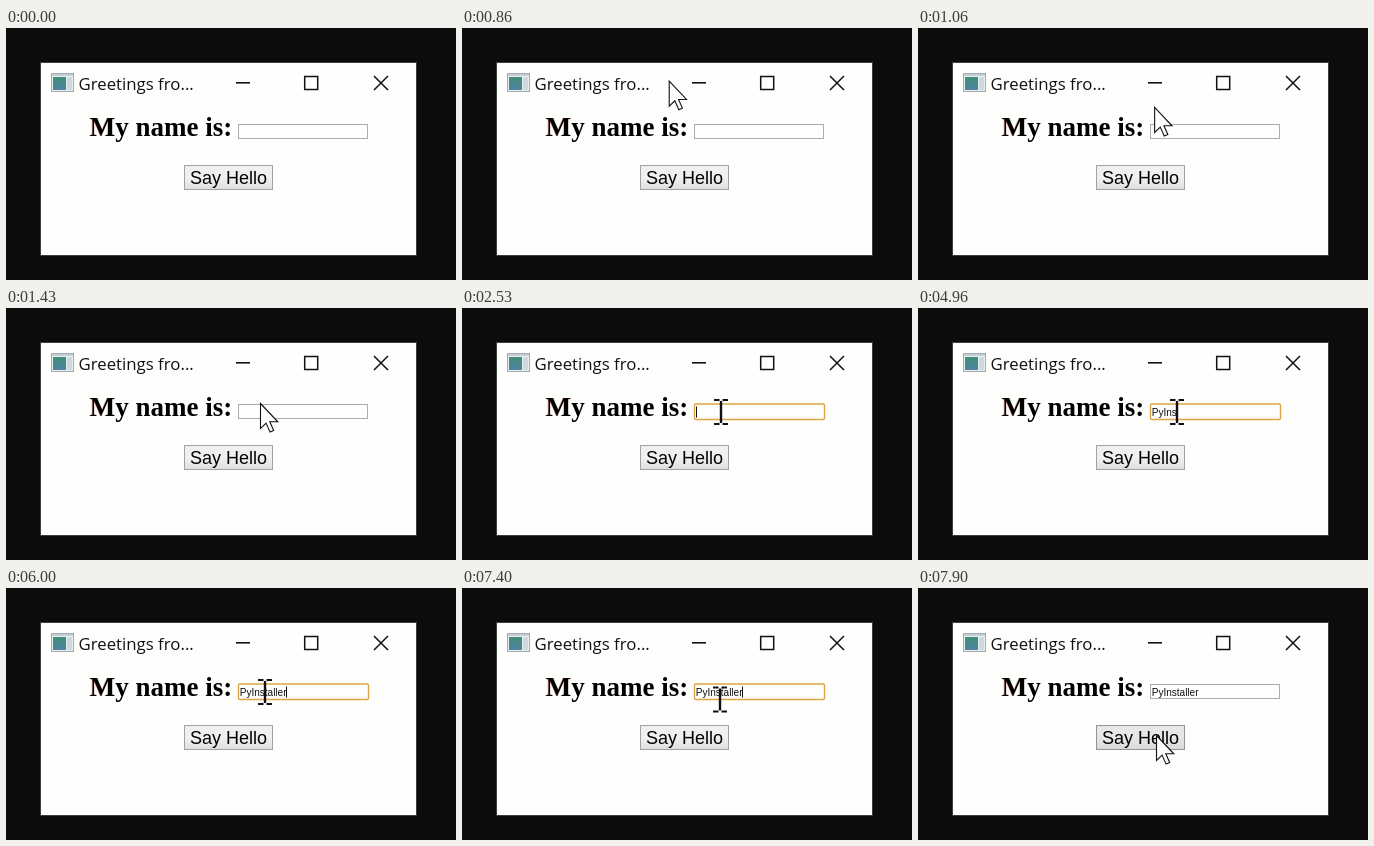
An HTML page with a canvas for the animation above (8000 ms loop, 450 by 252 pixels).

```html
<!DOCTYPE html>
<html lang="en">
<head>
<meta charset="utf-8">
<title>Greeting window</title>
<style>
  html, body { margin: 0; width: 100%; height: 100%; overflow: hidden; background: #0b0b0b; }
  canvas { display: block; width: 450px; height: 252px; }
</style>
</head>
<body>
<canvas id="stage" width="450" height="252"></canvas>
<script>
const ctx = document.getElementById('stage').getContext('2d');
const LOOP = 8000;
const NAME = 'PyInstaller';
const KEY_TIMES = [4100, 4330, 4600, 4800, 4960, 5260, 5360, 5530, 5700, 5900, 6000];
const ARIAL = '"Liberation Sans", Arial, sans-serif';

const lerp = (a, b, p) => a + (b - a) * p;
const easeOut = (p, power) => 1 - Math.pow(1 - p, power);

// Progress from 0 to 1, held between pointer updates.
function stepped(t, start, end, steps) {
  const p = Math.floor((t - start) / (end - start) * steps + 0.04) / steps;
  return Math.min(1, Math.max(0, p));
}

function box(x, y, w, h, fill) {
  ctx.fillStyle = fill;
  ctx.fillRect(x, y, w, h);
}

function outline(x, y, w, h, color, width = 1) {
  ctx.strokeStyle = color;
  ctx.lineWidth = width;
  ctx.strokeRect(x, y, w, h);
}

function text(str, x, y, font, color = '#000') {
  ctx.font = font;
  ctx.fillStyle = color;
  ctx.fillText(str, x, y);
}

function line(width, ...points) {
  ctx.strokeStyle = '#111';
  ctx.lineWidth = width;
  ctx.beginPath();
  for (let i = 0; i < points.length; i += 4) {
    ctx.moveTo(points[i], points[i + 1]);
    ctx.lineTo(points[i + 2], points[i + 3]);
  }
  ctx.stroke();
}

function vertical(y0, y1, ...colors) {
  const g = ctx.createLinearGradient(0, y0, 0, y1);
  colors.forEach((c, i) => g.addColorStop(i / (colors.length - 1), c));
  return g;
}

function drawWindow() {
  box(0, 0, 450, 252, '#0c0c0c');
  box(34, 34, 377, 194, '#38403e');
  box(35, 35, 375, 192, '#fefefd');

  box(45, 45, 23, 19, '#a3abb0');
  box(46, 46, 21, 17, '#e9eef0');
  box(46, 46, 21, 2, '#c3ccd2');
  box(47, 49, 13, 13, vertical(49, 62, '#3f8f78', '#4f82a0'));
  box(61, 49, 5, 13, '#cfd8dc');

  text('Greetings fro...', 72.5, 62, '16.8px "Open Sans", "Noto Sans", sans-serif', '#111');
  line(1.6, 230, 54.8, 244, 54.8);
  outline(298.7, 48.5, 13, 13, '#111', 1.5);
  line(1.5, 368, 48, 382, 62, 382, 48, 368, 62);

  const heading = 'bold 27px "Liberation Serif", "Times New Roman", serif';
  text('M', 83, 108, heading, 'rgba(220,80,60,.55)');
  text('My name is:', 83.7, 108, heading);
}

function drawInput(t) {
  const focused = t >= 2530 && t < 7900;
  box(232, 96, 130, 15, '#fff');
  if (focused) {
    ctx.beginPath();
    ctx.roundRect(232.5, 96, 130, 15.5, 1.5);
    ctx.strokeStyle = '#dca543';
    ctx.lineWidth = 1.4;
    ctx.stroke();
  } else {
    outline(232.5, 96.5, 129, 14, '#acacac');
  }

  const typed = NAME.slice(0, KEY_TIMES.filter(k => t >= k).length);
  text(typed, 233.8, 107.5, '10px ' + ARIAL, '#111');

  const blinkOff = (t >= 3860 && t < 4100) || (t >= 6530 && t < 7060) || t >= 7590;
  if (focused && !blinkOff) {
    box(Math.round(233.8 + ctx.measureText(typed).width), 98.5, 1, 11, '#111');
  }
}

function drawButton(hover, pressed) {
  const [top, bottom, border] =
    pressed ? ['#e7e7e7', '#d9d9d9', '#949494'] :
    hover ? ['#f3f3f3', '#e3e3e3', '#969696'] :
    ['#f0f0f0', '#dedede', '#a2a2a2'];
  box(178, 137, 89, 25, vertical(137, 162, top, top, bottom));
  outline(178.5, 137.5, 88, 24, border);
  text('Say Hello', 184, 155.5, '18px ' + ARIAL);
}

function drawArrow(x, y) {
  const shape = new Path2D('M0 0V25L5.6 19.6L9.6 28.6L13.2 27L9.3 18.3H17.3Z');
  ctx.save();
  ctx.translate(x + 0.5, y + 0.5);
  ctx.fillStyle = '#fff';
  ctx.fill(shape);
  ctx.strokeStyle = '#111';
  ctx.lineWidth = 1.1;
  ctx.stroke(shape);
  ctx.restore();
}

function drawBeam(x, y) {
  line(2.4, x, y - 11, x, y + 11);
  for (const side of [-1, 1]) {
    const end = y + side * 12;
    line(2, x - 7, end, x - 1.5, end, x + 1.5, end, x + 7, end);
  }
}

function pointerAt(t) {
  if (t < 630) return null;
  if (t < 1460) {
    const p = easeOut(stepped(t, 630, 1430, 21), 2.4);
    return { x: lerp(148, 254, p), y: lerp(0, 95, p) };
  }
  if (t < 7400) {
    const p = easeOut(stepped(t, 1460, 1660, 4), 1.5);
    return { x: lerp(257.5, 259, p), y: lerp(100, 104, p), beam: true };
  }
  const p = easeOut(stepped(t, 7400, 7630, 7), 1.5);
  return { x: lerp(258, 238, p), y: lerp(111.5, 147, p), beam: p === 0 };
}

function draw(t) {
  const pointer = pointerAt(t);
  drawWindow();
  drawInput(t);
  drawButton(pointer && pointer.y > 137, t >= 7900);
  if (pointer) (pointer.beam ? drawBeam : drawArrow)(pointer.x, pointer.y);
}

const start = performance.now();
function tick() {
  draw((performance.now() - start) % LOOP);
  requestAnimationFrame(tick);
}
tick();
</script>
</body>
</html>
```
